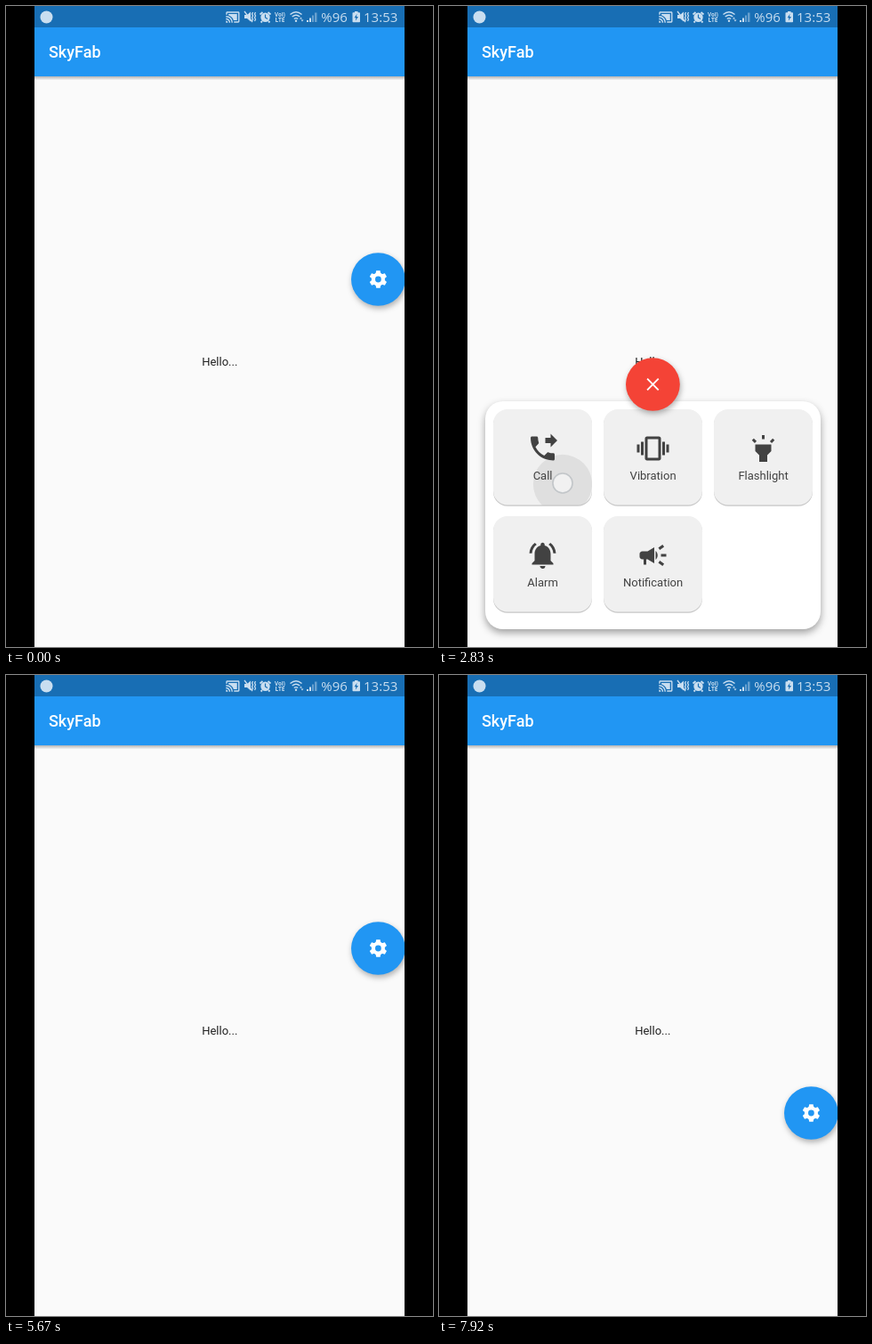
An HTML page that plays this animation: 480x720 px, repeating every 8 s.

```html
<!DOCTYPE html>
<html lang="en">
<head>
<meta charset="utf-8">
<title>Floating menu</title>
<style>
html, body { margin: 0; width: 100%; height: 100%; overflow: hidden; background: #000; }
svg { display: block; width: 480px; height: 720px; }
text { font-family: Roboto, sans-serif; }
.label { font-size: 13px; text-anchor: middle; }
.status text { font-family: "Open Sans", "Noto Sans", sans-serif; }
.line { fill: none; stroke: #c9def0; }
#panel { filter: drop-shadow(0 4px 4px rgba(0,0,0,.36)); }
#fab { filter: drop-shadow(1px 3px 3px rgba(0,0,0,.3)); }
</style>
</head>
<body>
<svg viewBox="0 0 480 720">
  <defs>
    <clipPath id="screen"><rect x="32" width="416" height="720"/></clipPath>
    <linearGradient id="fade" x2="0" y2="1">
      <stop stop-color="#000" stop-opacity=".28"/>
      <stop offset="1" stop-color="#000" stop-opacity="0"/>
    </linearGradient>
  </defs>
  <rect width="480" height="720"/>
  <g clip-path="url(#screen)">
    <rect x="32" width="416" height="720" fill="#fafafa"/>
    <text class="label" x="240.3" y="404" fill="#212121">Hello...</text>
    <rect x="32" y="79" width="416" height="4.5" fill="url(#fade)"/>
    <rect x="32" y="24" width="416" height="55" fill="#2196f3"/>
    <text x="48" y="58" font-size="18" font-weight="500" fill="#fff">SkyFab</text>
    <g class="status" fill="#c9def0">
      <rect x="32" width="416" height="24" fill="#186eb4"/>
      <circle cx="45.5" cy="12.5" r="7"/>
      <g transform="translate(246.6 4.2) scale(.69)">
        <path d="M21 3H3c-1.1 0-2 .9-2 2v3h2V5h18v14h-7v2h7c1.1 0 2-.9 2-2V5c0-1.1-.9-2-2-2zM1 18v3h3c0-1.66-1.34-3-3-3zm0-4v2c2.76 0 5 2.24 5 5h2c0-3.87-3.13-7-7-7zm0-4v2c4.97 0 9 4.03 9 9h2c0-6.08-4.93-11-11-11zM19 7H5v1.63c3.96 1.28 7.09 4.41 8.37 8.37H19V7z"/>
      </g>
      <path d="M268 10h3l4-3.5v11l-4-3.5h-3z"/>
      <path class="line" stroke-width="1.3" d="M268 6l9 12M277.5 7l-1 2 1 2-1 2 1 2-1 2M280.500 7l-1 2 1 2-1 2 1 2-1 2"/>
      <circle cx="291.500" cy="12.800" r="5.200"/>
      <path class="line" stroke-width="1.800" d="M285.500 9.500l3-2.500M297.500 9.500l-3-2.500M288 17l-1.500 1.500M295 17l1.500 1.500"/>
      <path d="M291.500 9.500v3.500l2.500 1.500" fill="none" stroke="#186eb4" stroke-width="1.200"/>
      <text x="308" y="11.500" font-size="6.200" font-weight="700" text-anchor="middle">VoI)</text>
      <text x="308" y="18" font-size="6.500" font-weight="700" text-anchor="middle">LTE</text>
      <path class="line" stroke-width="1.400" d="M319.500 9.500q6.500-5.500 13 0M321.700 12q4.300-3.500 8.600 0M323.800 14.500q2.200-1.800 4.400 0"/>
      <circle cx="326" cy="16.700" r="1.200"/>
      <path d="M330 14.500l1.500-2 1.500 2zM331.500 15.500h3l-1.500 2z"/>
      <path d="M338 16h2v2h-2zM341 13.500h2v4.500h-2z"/>
      <path opacity=".45" d="M344 10.500h2v7.500h-2zM347 7.500h2.500v10.500h-2.500z"/>
      <text x="354.300" y="18" font-size="15">%96</text>
      <path d="M392 6h3.500v1.200h1.700q.8 0 .8.800v9.500q0 .8-.8.800h-6.900q-.8 0-.8-.8v-9.500q0-.8.800-.8h1.700z"/>
      <path d="M394.600 8.800l-3 4.500h1.900l-.7 3.500 3.200-4.700h-2z" fill="#186eb4"/>
      <text x="402" y="18" font-size="15">13:53</text>
    </g>
    <g id="panel">
      <rect x="52" y="444" width="377" height="256" rx="20" fill="#fff"/>
      <g id="tiles"></g>
    </g>
    <g id="fab">
      <ellipse id="disc" rx="30.400" ry="29.700"/>
      <g id="gear" fill="#fff"><circle r="5.500" fill="none" stroke="#fff" stroke-width="4.200"/></g>
      <path id="cross" d="M-6.300-6.300L6.300 6.300M6.300-6.300L-6.300 6.300" stroke="#fff" stroke-width="1.900"/>
    </g>
    <circle id="dot" r="11" fill="#fff" fill-opacity=".55" stroke="#aeb4b8" stroke-opacity=".65" stroke-width="1.600"/>
  </g>
</svg>
<script>
const LOOP = 8000, STEP = 1000 / 12;
const $ = id => document.getElementById(id);

function add(parent, tag, attrs) {
  const el = document.createElementNS("http://www.w3.org/2000/svg", tag);
  for (const k in attrs) el.setAttribute(k, attrs[k]);
  return parent.appendChild(el);
}

const items = [
  ["Call", "M18 11l5-5-5-5v3h-4v4h4v3zm2 4.5c-1.25 0-2.45-.2-3.57-.57-.35-.11-.74-.03-1.02.24l-2.2 2.2c-2.83-1.44-5.15-3.75-6.59-6.59l2.2-2.21c.28-.26.36-.65.25-1C8.7 6.45 8.5 5.25 8.5 4c0-.55-.45-1-1-1H4c-.55 0-1 .45-1 1 0 9.39 7.61 17 17 17 .55 0 1-.45 1-1v-3.5c0-.55-.45-1-1-1z"],
  ["Vibration", "M0 15h2V9H0v6zm3 2h2V7H3v10zm19-8v6h2V9h-2zm-3 8h2V7h-2v10zM16.5 3h-9C6.67 3 6 3.67 6 4.5v15c0 .83.67 1.5 1.5 1.5h9c.83 0 1.5-.67 1.5-1.5v-15c0-.83-.67-1.5-1.5-1.5zM16 19H8V5h8v14z"],
  ["Flashlight", "M6 14l3 3v5h6v-5l3-3V9H6zm5-12h2v3h-2zM3.5 5.875L4.914 4.46l2.12 2.122L5.62 7.997zm13.46.71l2.123-2.12 1.414 1.414L18.375 8z"],
  ["Alarm", "M7.58 4.08L6.15 2.65C3.75 4.48 2.17 7.3 2.03 10.5h2c.15-2.65 1.51-4.97 3.55-6.42zm12.39 6.42h2c-.15-3.2-1.73-6.02-4.12-7.85l-1.42 1.43c2.02 1.45 3.39 3.77 3.54 6.42zM18 11c0-3.07-1.64-5.64-4.5-6.32V4c0-.83-.67-1.5-1.5-1.5s-1.5.67-1.5 1.5v.68C7.63 5.36 6 7.92 6 11v5l-2 2v1h16v-1l-2-2v-5zm-6 11c.14 0 .27-.01.4-.04.65-.14 1.18-.58 1.44-1.18.1-.24.15-.5.15-.78h-4c.01 1.1.9 2 2.01 2z"],
  ["Notification", "M18 11v2h4v-2h-4zm-2 6.61c.96.71 2.21 1.65 3.2 2.39.4-.53.8-1.07 1.2-1.6-.99-.74-2.24-1.68-3.2-2.4-.4.54-.8 1.08-1.2 1.61zM20.4 5.6c-.4-.53-.8-1.07-1.2-1.6-.99.74-2.24 1.68-3.2 2.4.4.53.8 1.07 1.2 1.6.96-.72 2.21-1.65 3.2-2.4zM4 9c-1.1 0-2 .9-2 2v2c0 1.1.9 2 2 2h1v4h2v-4h1l5 3V6L8 9H4zm11.5 3c0-1.33-.58-2.53-1.5-3.35v6.69c.92-.81 1.5-2.01 1.5-3.34z"]
];

const tiles = items.map(([name, icon], i) => {
  const x = 61 + i % 3 * 124, y = 453 + Math.floor(i / 3) * 120;
  const g = add($("tiles"), "g", { transform: `translate(${x} ${y})` });
  const box = { width: 111, height: 107.5, rx: 16 };
  add(add(g, "clipPath", { id: "clip" + i }), "rect", box);
  add(g, "rect", { ...box, y: 1.3, fill: "#c6c6c6" });
  const face = add(g, "rect", box);
  const ripple = add(add(g, "g", { "clip-path": `url(#clip${i})` }), "circle", {});
  const ink = add(g, "g", {});
  add(ink, "path", { d: icon, transform: "translate(37.5 26) scale(1.5)" });
  add(ink, "text", { class: "label", x: 55.6, y: 78.5 }).textContent = name;
  return { x, y, face, ripple, ink };
});

for (let a = 0; a < 360; a += 60)
  add($("gear"), "path", { d: "M-2.9-6.500L-2.200-9.800H2.200L2.900-6.500z", transform: `rotate(${a})` });

const taps = [
  { tile: 0, x: 123, y: 529, down: 1830 },
  { tile: 0, x: 139, y: 536, down: 2660 },
  { tile: 1, x: 255, y: 510, down: 3000 }
];
const TOGGLE = 160, RELEASE = 240, RIPPLE_END = 330;

const mix = (a, b, p) => a + (b - a) * p;
const clamp = v => Math.min(1, Math.max(0, v));
const ease = (t, from, to) => {
  const p = clamp((t - from) / (to - from));
  return p * p * (3 - 2 * p);
};

// [start, end, x, y]: each leg begins where the previous one ended
const legs = [
  [170, 690, 240.400, 425],
  [5160, 5640, 418.400, 307],
  [6060, 6520, 105, 355],
  [6520, 6800, 62.500, 359],
  [7300, 7700, 375, 486],
  [7700, 7900, 418.400, 492]
];

function fabAt(t) {
  let x = 418.400, y = 307;
  for (const [from, to, nx, ny] of legs) {
    const p = ease(t, from, to);
    x = mix(x, nx, p);
    y = mix(y, ny, p);
  }
  return [x, y];
}

function touchAt(t, fab) {
  if (t >= 80 && t < 240) return [421, 310];
  if (t >= 5000 && t < 5160) return [248, 434];
  if ((t >= 6000 && t < 6520) || (t >= 7250 && t < 7700)) return [fab[0] + 2, fab[1] + 3];
  const tap = taps.find(k => t >= k.down && t < k.down + RELEASE);
  return tap && [tap.x, tap.y];
}

function place(el, x, y) {
  el.setAttribute("transform", `translate(${x.toFixed(2)} ${y.toFixed(2)})`);
}

function drawTile(tile, i, t) {
  const mine = taps.filter(k => k.tile === i);
  const on = mine.filter(k => t >= k.down + TOGGLE).length % 2 === 1;
  tile.face.setAttribute("fill", on ? "#2196f3" : "#f0f0f0");
  tile.ink.setAttribute("fill", on ? "#fff" : "#424242");
  const tap = mine.find(k => t > k.down + 40 && t < k.down + RIPPLE_END);
  tile.ripple.setAttribute("visibility", tap ? "inherit" : "hidden");
  if (!tap) return;
  const dt = t - tap.down;
  tile.ripple.setAttribute("cx", tap.x - tile.x);
  tile.ripple.setAttribute("cy", tap.y - tile.y + 1);
  tile.ripple.setAttribute("r", 8 + dt * .145);
  tile.ripple.setAttribute("fill-opacity", .07 * (1 - clamp((dt - 190) / 150)));
}

function draw(t) {
  const open = ease(t, 170, 690) - ease(t, 5160, 5640);
  const fab = fabAt(t);
  place($("fab"), ...fab);
  const rgb = [[33, 244], [150, 67], [243, 54]].map(c => Math.round(mix(...c, open)));
  $("disc").setAttribute("fill", `rgb(${rgb})`);
  $("gear").setAttribute("opacity", clamp(1 - 2 * open));
  $("cross").setAttribute("opacity", clamp(2 * open - 1));

  place($("panel"), 0, (1 - open) * 285);
  $("panel").setAttribute("visibility", open > 0 ? "visible" : "hidden");
  tiles.forEach((tile, i) => drawTile(tile, i, t));

  const touch = touchAt(t, fab);
  $("dot").setAttribute("visibility", touch ? "visible" : "hidden");
  if (touch) place($("dot"), ...touch);
}

const start = performance.now();
function tick() {
  const t = (performance.now() - start) % LOOP;
  draw(Math.floor((t + 4) / STEP) * STEP % LOOP);
  requestAnimationFrame(tick);
}
tick();
</script>
</body>
</html>
```
